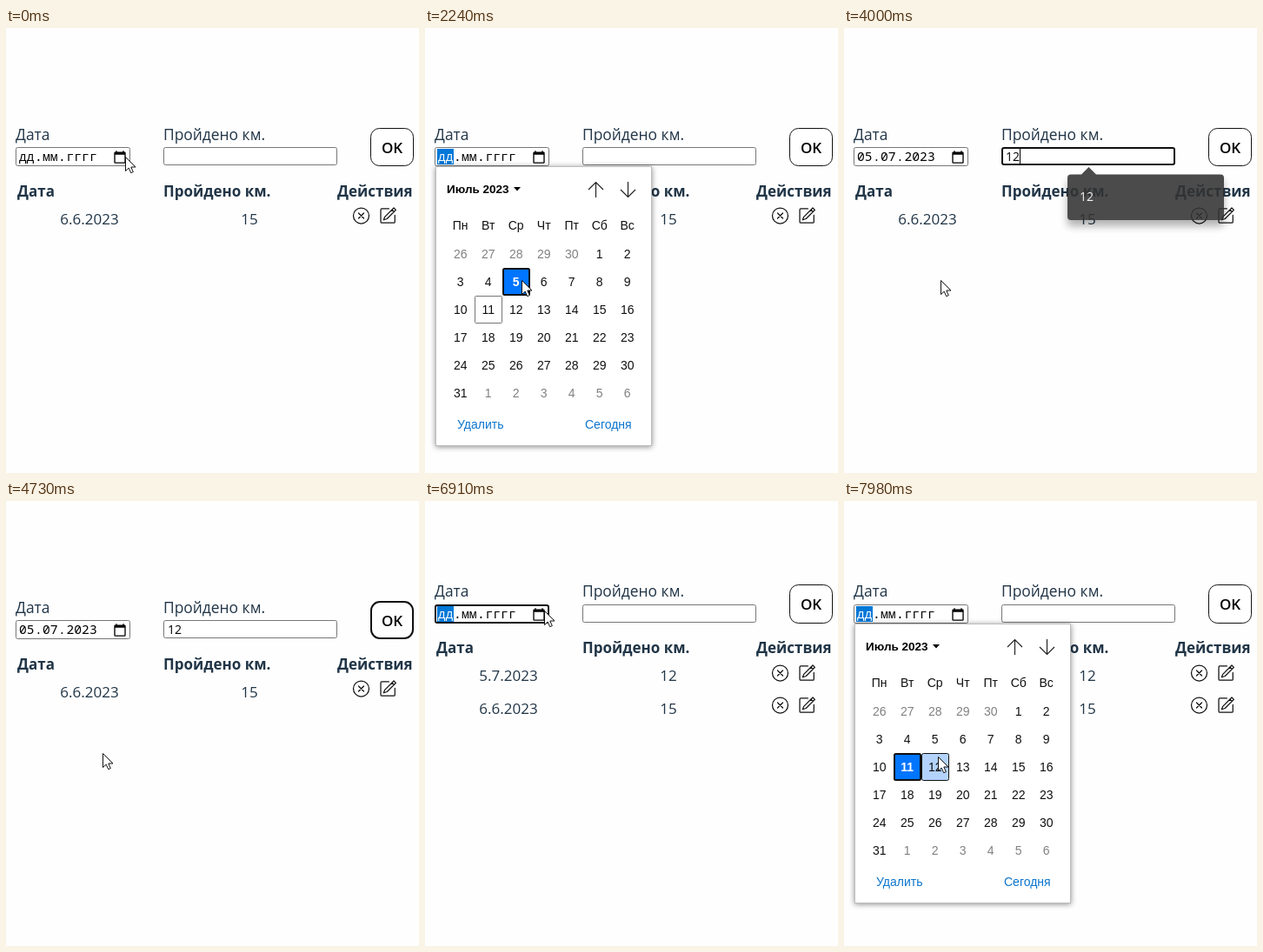
Write an HTML page that moves like this. It is 475 by 512 pixels and loops after 8 s.

```html
<!DOCTYPE html>
<html lang="ru">
<head>
<meta charset="utf-8">
<title>Дневник пробежек</title>
<style>
  html, body { margin: 0; width: 100%; height: 100%; overflow: hidden; background: #fefefe; }
  svg { display: block; width: 475px; height: 512px; }
  text { font: 17px "Open Sans", "Noto Sans", sans-serif; fill: #213547; white-space: pre; }
  .label { font-size: 17.4px; }
  .b { font-weight: 700; }
  .ok { font-weight: 600; fill: #000; }
  .m { text-anchor: middle; }
  .mono { font: 14.67px "Noto Sans Mono", "DejaVu Sans Mono", monospace; fill: #000; }
  .hint { font-family: "Liberation Mono", monospace; }
  .km { font-size: 14px; fill: #000; }
  .cal text { font: 14px "Liberation Sans", Arial, sans-serif; fill: #101010; }
  .cal .title { font-size: 13.5px; font-weight: 700; fill: #000; }
  .cal .dim { fill: #808080; }
  .cal .link { fill: #0b74ce; }
  .cal .on { fill: #fff; font-weight: 700; }
  .cal .frame { fill: #fff; stroke: #bdbdbd; filter: drop-shadow(0 1px 3px rgba(0,0,0,.45)); }
  .tip { filter: drop-shadow(0 7px 5px rgba(0,0,0,.35)); }
</style>
</head>
<body>
<svg id="stage" viewBox="0 0 475 512"></svg>
<script>
const LOOP = 8000;
const stage = document.getElementById('stage');

// [time, changed values]; every entry builds on the ones before it
const steps = [
  [0, { cur: [137, 148], added: false, open: false, hover: -1, sel: 15, date: '', seg: -1,
        focus: '', km: '', caret: 0, tip: 0 }],
  [710, { focus: 'date', seg: 0 }],
  [830, { focus: '', open: true }],
  [1260, { cur: [137, 206] }],
  [1380, { cur: [136, 252], hover: 3 }],
  [1530, { cur: [128, 276], hover: 10 }],
  [1650, { cur: [114, 284], hover: 9 }],
  [1800, { cur: [111, 290] }],
  [2240, { sel: 9, hover: -1 }],
  [2390, { open: false, focus: 'date', date: '05.07.2023' }],
  [2950, { seg: 1 }],
  [3100, { seg: 2 }],
  [3350, { seg: -1, focus: 'km', caret: 186 }],
  [3880, { km: '1', caret: 194, tip: 1 }],
  [4000, { km: '12', caret: 202, tip: 0.88 }],
  [4150, { tip: 0 }],
  [4580, { caret: 0 }],
  [4730, { focus: 'ok' }],
  [5380, { added: true, date: '', km: '', sel: 15 }],
  [6370, { cur: [122, 258] }],
  [6490, { cur: [137, 188] }],
  [6640, { cur: [130, 154] }],
  [6790, { cur: [137, 126] }],
  [6910, { focus: 'date', seg: 0 }],
  [7030, { focus: '', open: true }],
  [7560, { cur: [137, 204] }],
  [7680, { cur: [135, 281], hover: 10 }],
  [7830, { cur: [128, 311], hover: 17 }],
  [7980, { cur: [108, 294], hover: 16 }]
];
const states = [];
steps.forEach(([, change], i) => states.push({ ...states[i - 1], ...change }));

const text = (x, y, s, cls = '') => `<text x="${x}" y="${y}" class="${cls}">${s}</text>`;
const rect = (x, y, w, h, attrs) => `<rect x="${x}" y="${y}" width="${w}" height="${h}" ${attrs}/>`;
const at = (x, y, s, more = '') => `<g transform="translate(${x} ${y})${more}">${s}</g>`;

function box(x, y, w, h, focused, color, r) {
  return focused
    ? rect(x + 1, y + 1, w - 2, h - 2, `rx="${r}" fill="#fff" stroke="#101010" stroke-width="2"`)
    : rect(x + 0.5, y + 0.5, w - 1, h - 1, `rx="${r}" fill="#fff" stroke="${color}"`);
}

const calendarIcon = at(123, 140.5,
  '<path fill-rule="evenodd" d="M4 3H5V1H7V3H17V1H19V3H20Q22 3 22 5V21Q22 23 20 23H4Q2 23 2 21V5Q2 3 4 3ZM4 8V21H20V8Z"/>',
  ' scale(.667)');

function dateField(s) {
  const parts = (s.date || 'дд.мм.гггг').split('.');
  const font = s.date ? 'mono' : 'mono hint';
  const left = [15, 42, 69.5], back = [[14, 19], [41, 20], [69, 36]];
  let out = box(11, 137, 132, 22, s.focus === 'date', '#767676', 2);
  parts.forEach((p, i) => {
    const on = s.seg === i;
    if (on) out += rect(back[i][0], 139, back[i][1], 18, 'fill="#0078d7"');
    out += `<text x="${left[i]}" y="153" class="${font}"${on ? ' style="fill:#fff"' : ''}>${p}</text>`;
    if (i < 2) out += text(left[i] + 18, 153, '.', font);
  });
  return out + calendarIcon;
}

function kmField(s) {
  let out = box(181, 137, 200, 21, s.focus === 'km', '#767676', 2) + text(186, 153, s.km, 'km');
  if (s.caret) out += rect(s.caret, 139, 1, 17, 'fill="#000"');
  return out;
}

const rowIcons = y => at(398.5, y - 10,
  `<g fill="none" stroke="#111" stroke-linecap="round" stroke-linejoin="round">
    <circle cx="8" cy="8" r="7.2"/><path d="M5.6 5.6L10.4 10.4M10.4 5.6L5.6 10.4"/>
    <g transform="translate(24.5 0)"><path d="M9 1.5H2.5Q1.5 1.5 1.5 2.5V13.5Q1.5 14.5 2.5 14.5H13.5Q14.5 14.5 14.5 13.5V7.5"/>
    <path d="M13.5 .8L15.4 2.7L7.3 10.8L4.2 11.8L5.2 9.1ZM11.8 2.5L13.7 4.4"/></g></g>`,
  ' scale(1.25)');

const row = (y, iconY, date, km) => text(96, y, date, 'm') + text(280, y, km, 'm') + rowIcons(iconY);

function calendar(s) {
  let out = rect(12.5, 159.5, 248, 321, 'class="frame"') + text(25, 190, 'Июль 2023', 'title')
    + '<path d="M102 183H110L106 187.5Z"/>'
    + `<path fill="none" stroke="#222" stroke-width="1.2"
        d="M196.5 195V177.5M188 186L196.5 177.5L205 186M233.5 177V194.5M225 186L233.5 194.5L242 186"/>`;
  'Пн Вт Ср Чт Пт Сб Вс'.split(' ').forEach((d, c) => out += text(40.7 + 32 * c, 232, d, 'm'));
  for (let i = 0; i < 42; i++) {
    const x = 25 + 32 * (i % 7), y = 244 + 32 * Math.floor(i / 7);
    const day = i < 5 ? 26 + i : i < 36 ? i - 4 : i - 35;
    let cls = i < 5 || i > 35 ? 'm dim' : 'm';
    if (i === s.sel) {
      out += rect(x + 1, y + 1, 30, 30, 'rx="1.5" fill="#0075ff" stroke="#101010" stroke-width="2"');
      cls = 'm on';
    } else if (i === s.hover) {
      out += rect(x + 0.5, y + 0.5, 31, 31, 'rx="2" fill="#b3d3fc" stroke="#101010"');
    } else if (i === 15) {
      out += rect(x + 0.5, y + 0.5, 31, 31, 'rx="1" fill="none" stroke="#767676"');
    }
    out += text(x + 15.7, y + 21, day, cls);
  }
  out += text(37, 461, 'Удалить', 'link') + text(184, 461, 'Сегодня', 'link');
  return `<g class="cal">${out}</g>`;
}

const tip = opacity => `<g opacity="${opacity}"><g class="tip">
  <path fill="#333" d="M261 168.5H273L281.5 160L290 168.5H433Q437 168.5 437 172.5V217Q437 221 433 221H261Q257 221 257 217V172.5Q257 168.5 261 168.5Z"/></g>
  <text x="271" y="199" class="km" style="fill:#f4f4f4">12</text></g>`;

const cursor = '<path d="M.5 .5V16.6L4.2 13.1L6.7 18.7L9.3 17.6L6.8 12H12Z" fill="#fff" stroke="#111"/>';

function draw(s) {
  const up = s.added ? -18 : 0, upText = s.added ? -19 : 0;
  const labels = text(11, 129, 'Дата', 'label') + text(181, 129, 'Пройдено км.', 'label')
    + text(13, 194, 'Дата', 'b') + text(181, 194, 'Пройдено км.', 'b') + text(381, 194, 'Действия', 'b');
  const button = box(419, 115, 50, s.added ? 45 : 44, s.focus === 'ok', '#111', 10)
    + text(444, 144, 'OK', 'm ok');
  stage.innerHTML = at(0, upText, labels + button)
    + at(0, up, dateField(s) + kmField(s))
    + (s.added
      ? row(207, 198, '5.7.2023', 12) + row(245, 235, '6.6.2023', 15)
      : row(226, 216, '6.6.2023', 15))
    + (s.open ? at(0, up, calendar(s)) : '')
    + (s.tip ? tip(s.tip) : '')
    + at(s.cur[0], s.cur[1], cursor);
}

let shown = -1;
const start = performance.now();
function tick() {
  const t = (performance.now() - start) % LOOP;
  const i = steps.findLastIndex(([time]) => time <= t);
  if (i !== shown) draw(states[shown = i]);
  requestAnimationFrame(tick);
}
tick();
</script>
</body>
</html>
```
